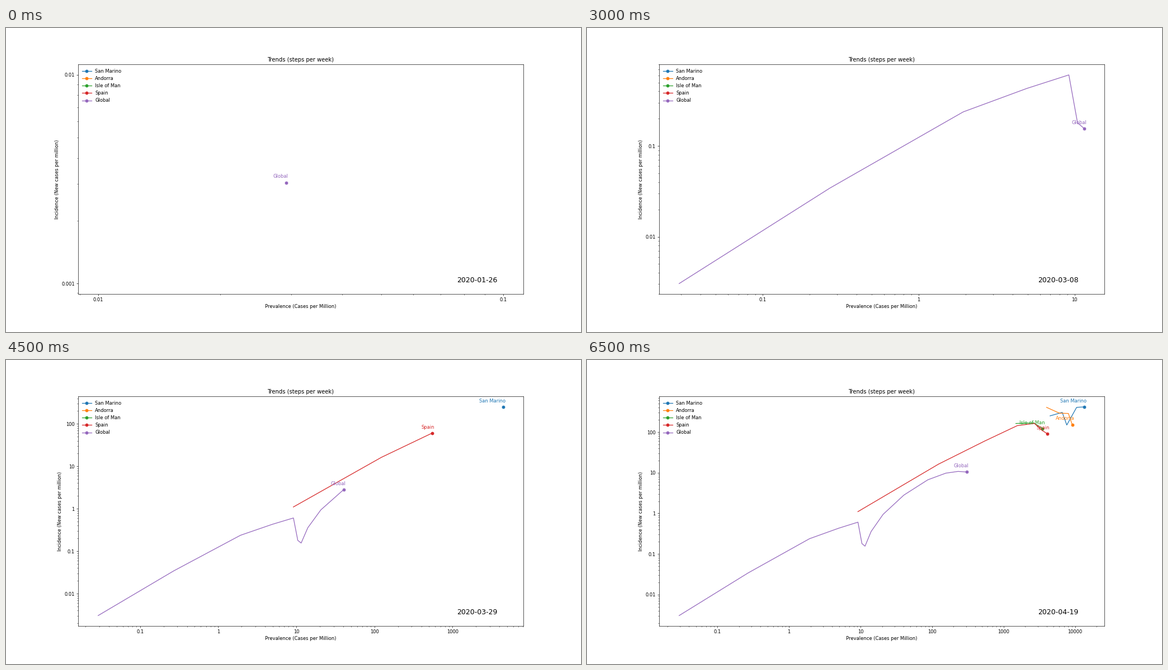
These frames come from a looping animation (1028 by 544 pixels, 10000 ms). A matplotlib script:

```python
import numpy as np
import matplotlib.pyplot as plt
from matplotlib.animation import FuncAnimation
from matplotlib.ticker import NullFormatter

WIDTH, HEIGHT, DPI = 1028, 544, 60
FRAMES, INTERVAL = 20, 500
LAST_WEEK = 13
FIRST_DATE = np.datetime64("2020-01-26")

# Region: (first week shown, weekly cases per million, led by the week before)
REGIONS = {
    "San Marino": (9, [2705, 4460, 6600, 7645, 10490, 13407]),
    "Andorra": (10, [1139, 3986, 6031, 8045, 9112]),
    "Isle of Man": (11, [341, 1482, 2658, 3505]),
    "Spain": (7, [1.47, 9.18, 123.3, 546, 1557, 2699, 3465, 4101]),
    "Global": (0, [0.00775, 0.0291, 0.27, 1.933, 4.95, 9.2, 10.46, 11.55,
                   14.05, 20.65, 40.4, 87.3, 155.6, 231, 304]),
}

fig, ax = plt.subplots(figsize=(WIDTH / DPI, HEIGHT / DPI), dpi=DPI)
fig.subplots_adjust(left=0.125, right=0.9, bottom=0.125, top=0.88)


def draw_region(name, week):
    start, cases = REGIONS[name]
    shown = max(0, week - start + 1)
    prevalence = cases[1:][:shown]
    incidence = (np.diff(cases) / 7)[:shown]
    line, = ax.plot(prevalence, incidence, "o-", label=name,
                    markevery=slice(-1, None))
    if shown:
        ax.annotate(name, (prevalence[-1], incidence[-1]), xytext=(5, 10),
                    textcoords="offset points", ha="right",
                    color=line.get_color())


def update(frame):
    week = min(frame, LAST_WEEK)
    ax.clear()
    ax.set(xscale="log", yscale="log", title="Trends (steps per week)",
           xlabel="Prevalence (Cases per Million)",
           ylabel="Incidence (New cases per million)")
    for axis in (ax.xaxis, ax.yaxis):
        axis.set_major_formatter("{x:g}")
        axis.set_minor_formatter(NullFormatter())
    for name in REGIONS:
        draw_region(name, week)
    ax.legend(loc="upper left", frameon=False)
    # The date label stops one step before the curves do.
    date = FIRST_DATE + 7 * min(week, LAST_WEEK - 1)
    ax.text(0.85, 0.05, str(date), fontsize=15, transform=ax.transAxes)
    return ax.get_children()


anim = FuncAnimation(fig, update, frames=FRAMES, interval=INTERVAL,
                     init_func=lambda: update(0), repeat=True, repeat_delay=0)
plt.show()
```
